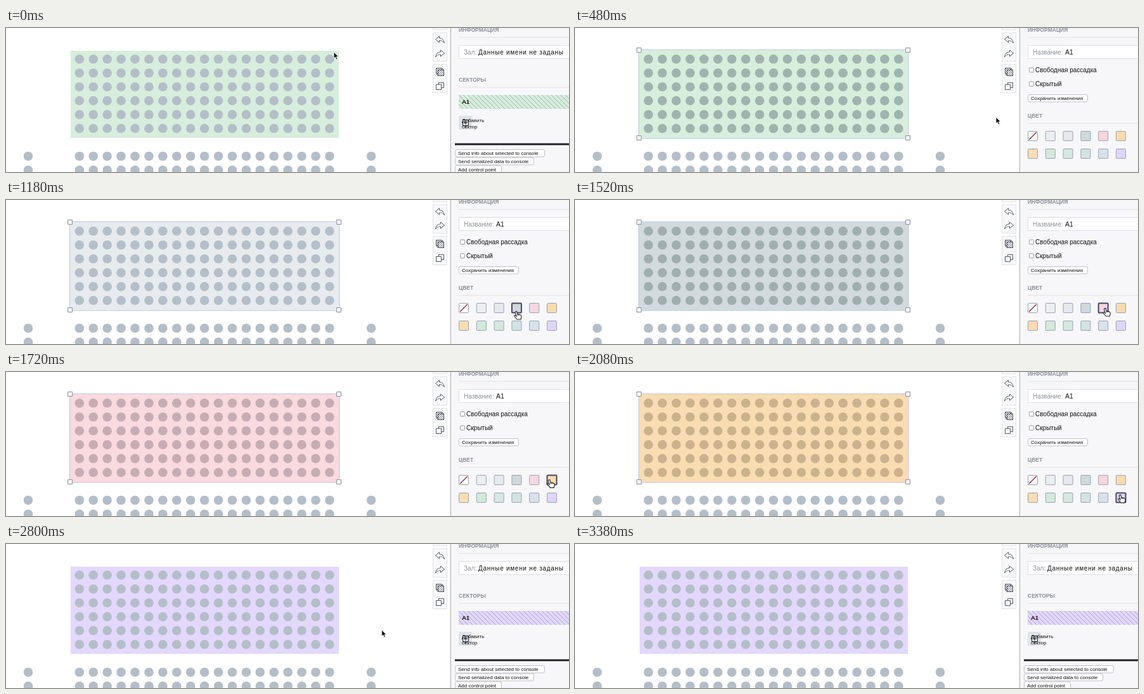
Animation, 888 px wide and 228 px high, one loop 3400 ms. Source, as an HTML page with a canvas:

```html
<!DOCTYPE html>
<html lang="ru">
<head>
<meta charset="utf-8">
<style>
  html, body { margin: 0; overflow: hidden; background: #fff; }
  canvas { display: block; }
</style>
</head>
<body>
<canvas id="stage" width="888" height="228"></canvas>
<script>
const ctx = document.getElementById('stage').getContext('2d');
const LOOP = 3400, SELECT = 160, DESELECT = 2600;
const GREY = '#8b9099', INK = '#111', SEAT = '#b4bec8';

// Cursor path: time, x, y
const PATH = [
  [0, 517, 38], [140, 514, 42], [480, 664, 141], [680, 748, 174], [780, 750, 174],
  [920, 777, 175], [1020, 778, 175], [1120, 805, 177], [1280, 805, 177],
  [1460, 836, 172], [1600, 837, 172], [1760, 861, 171], [1880, 861, 172],
  [2020, 860, 195], [2160, 860, 195], [2540, 594, 136], [2960, 592, 136], [3240, 640, 240]
];
// Sector colours: start time, fill, seat colour while selected
const FILLS = [
  [0, '#d8eedd', '#a1b3ae'], [740, '#eff1f4', '#b6c0ca'], [1000, '#e8ebee', '#b4bfc9'],
  [1260, '#d3dade', '#a1aeaf'], [1580, '#f9dade', '#c6adb4'],
  [1850, '#fadcb3', '#cbb28d'], [2130, '#e3d8fc', '#b5b2cb']
];
const SWATCHES = ['#fbf9fa', '#eceff2', '#e5e9ec', '#cfd8da', '#f8d7de', '#fbdbae',
  '#fbdcb4', '#d3eadb', '#d6e8e0', '#d3e3e2', '#d9e2ec', '#e0d6fb']
  .map((color, i) => ({ color, x: 714 + i % 6 * 27.8, y: i < 6 ? 163 : 191 }));

function rect(x, y, w, h, fill, stroke, radius = 0, width = 1) {
  ctx.beginPath();
  ctx.roundRect(x, y, w, h, radius);
  if (fill) { ctx.fillStyle = fill; ctx.fill(); }
  if (stroke) { ctx.strokeStyle = stroke; ctx.lineWidth = width; ctx.stroke(); }
}

function text(str, x, y, size = 10, color = INK, weight = 400, spacing = 0) {
  ctx.font = `${weight} ${size}px "Liberation Sans", Arial, sans-serif`;
  ctx.letterSpacing = spacing + 'px';
  ctx.fillStyle = color;
  ctx.fillText(str, x, y);
}

function path(d, x, y, stroke, fill, width = 1) {
  const p = new Path2D(d);
  ctx.save();
  ctx.translate(x, y);
  if (fill) { ctx.fillStyle = fill; ctx.fill(p); }
  if (stroke) { ctx.strokeStyle = stroke; ctx.lineWidth = width; ctx.stroke(p); }
  ctx.restore();
}

function hatch(x, y, w, h, step, color, dir = 1) {
  ctx.save();
  ctx.beginPath();
  ctx.rect(x, y, w, h);
  ctx.clip();
  ctx.beginPath();
  for (let k = x - h; k < x + w + h; k += step) {
    ctx.moveTo(k, y);
    ctx.lineTo(k + dir * h, y + h);
  }
  ctx.strokeStyle = color;
  ctx.lineWidth = 0.9;
  ctx.stroke();
  ctx.restore();
}

function seat(x, y, color) {
  ctx.beginPath();
  ctx.arc(x, y, 7.3, 0, 7);
  ctx.fillStyle = color;
  ctx.fill();
}

function hall(fill, seatColor, selected) {
  rect(102, 36, 423, 138, fill);
  if (selected) rect(100.5, 34.5, 425.5, 140.5, fill, '#bcc8ea');
  for (let row = 0; row < 8; row++) {
    const y = 49.3 + row * 21.95 + (row > 5 ? 22 : 0);
    for (let col = 0; col < 19; col++)
      seat(115.8 + col * 21.92, y, row < 6 && selected ? seatColor : SEAT);
    if (row > 5) { seat(35, y, SEAT); seat(576, y, SEAT); }
  }
  if (selected)
    for (const x of [97.5, 521.5]) for (const y of [31.5, 170.5])
      rect(x, y, 7, 7, '#f4f6f9', '#8c929c');
}

function toolbar() {
  for (const [y, h] of [[-20, 23], [7.5, 45], [57.5, 45]])
    rect(673.5, y, 22, h, '#f8f8fa', '#e2e3e6');
  const arrow = 'M-7-1 L-1-6 V-3 C4-3 6 0 7 5 C4 1 2 1 -1 1 V4 Z';
  path(arrow, 684.5, 19, '#555a62', '#fff');
  ctx.save();
  ctx.translate(684.5, 41);
  ctx.scale(-1, 1);
  path(arrow, 0, 0, '#555a62', '#fff');
  ctx.restore();
  rect(678.5, 63.5, 9, 9, null, '#555a62');
  rect(681.5, 66.5, 9, 9, '#f8f8fa', '#555a62');
  hatch(679, 64, 12, 12, 3, '#555a62');
  rect(682.5, 86.5, 8, 8, null, '#555a62');
  rect(678.5, 89.5, 8, 8, '#f8f8fa', '#555a62');
}

function heading(label, y) {
  text(label, 714, y, 8.5, GREY, 700);
  rect(714, y + 8.5, 174, 1, '#e1e2e6');
}

function button(label, x, y, w) {
  rect(x + .5, y + .5, w - 1, 11.5, '#fff', '#bfc1c8', 2.5);
  text(label, x + 5, y + 9.2, 8);
}

function panel() {
  rect(702, 0, 186, 228, '#f7f7fa');
  ctx.fillStyle = '#54565c';
  for (let y = 0; y < 228; y += 2) ctx.fillRect(701, y, 1, 1);
  heading('ИНФОРМАЦИЯ', 6);
  rect(714.5, 27.5, 180, 21, '#fff', '#dfe0e5');
}

function hallPanel(fill) {
  text('Зал:', 722, 41.5, 10, GREY);
  text('Данные имени не заданы', 745, 41.5, 10, INK, 400, 0.72);
  heading('СЕКТОРЫ', 85);
  rect(714, 106, 174, 22, fill);
  hatch(714, 106, 174, 22, 7.3, fill === FILLS[0][1] ? '#8fa99b' : '#9d91c4');
  text('A1', 719, 120, 9.5, INK, 700);
  rect(714, 139, 21, 22, '#dfe3ea', null, 2);
  rect(720.5, 145.5, 9, 9, null, '#222');
  path('M0-3V3M-3 0H3M0 4V8', 725, 150, '#222');
  text('Добавить', 719, 149, 8);
  text('сектор', 719, 158.5, 8);
  rect(708, 182.5, 180, 3, '#242029');
  button('Send info about selected to console', 708, 192, 142);
  button('Send serialized data to console', 708, 204.7, 125);
  button('Add control point', 708, 217.4, 74);
}

function sectorPanel(hovered) {
  text('Название:', 722, 41.5, 10, GREY);
  text('А1', 773, 41.5, 10.5);
  for (const [label, y] of [['Свободная рассадка', 69.5], ['Скрытый', 91.5]]) {
    rect(716.5, y - 6.5, 7, 7, '#fff', '#92959c', 1.5);
    text(label, 726, y);
  }
  button('Сохранить изменения', 714, 105, 95);
  heading('ЦВЕТ', 142);
  for (const s of SWATCHES) {
    const active = s === hovered;
    rect(s.x + .5, s.y + .5, 15, 15, s.color, active ? '#45476c' : '#98a3b3', 1, active ? 2 : 1);
  }
  path('M2 14L14 2', 714, 163, '#8c4a50', null, 1.6);
}

function cursor(x, y, hand) {
  if (hand)
    path('M-1 0 C0-1 1-1 1 1 L2 5 C3 3 4 4 4 5 C5 4 6 4 6 5 C8 5 8 6 8 8 L7 12 H1 L-3 7 C-4 5 -2 5 0 7 L-2 1 Z',
      x, y, '#222', '#fff', 1.1);
  else
    path('M0 0V10L2.3 8L4 12L5.8 11.2L4.2 7.4H7.2Z', x, y, '#fff', '#111', 0.8);
}

function cursorAt(t) {
  const i = PATH.findIndex(p => p[0] > t);
  if (i < 0) return null;
  const [a, b] = [PATH[i - 1], PATH[i]];
  const u = (t - a[0]) / (b[0] - a[0]), e = u * u * (3 - 2 * u);
  return { x: a[1] + (b[1] - a[1]) * e, y: a[2] + (b[2] - a[2]) * e };
}

function draw(now) {
  const t = Math.floor(now % LOOP / 20) * 20;
  const [, fill, seatColor] = FILLS.findLast(f => f[0] <= t);
  const selected = t >= SELECT && t < DESELECT;
  const p = cursorAt(t);
  const hovered = selected && p && SWATCHES.find(s =>
    p.x >= s.x && p.x <= s.x + 16 && p.y >= s.y && p.y <= s.y + 16);
  rect(0, 0, 888, 228, '#fff');
  hall(fill, seatColor, selected);
  toolbar();
  panel();
  if (selected) sectorPanel(hovered);
  else hallPanel(fill);
  if (p) cursor(p.x, p.y, hovered);
}

const start = performance.now();
function tick() {
  draw(performance.now() - start);
  requestAnimationFrame(tick);
}
tick();
</script>
</body>
</html>
```
